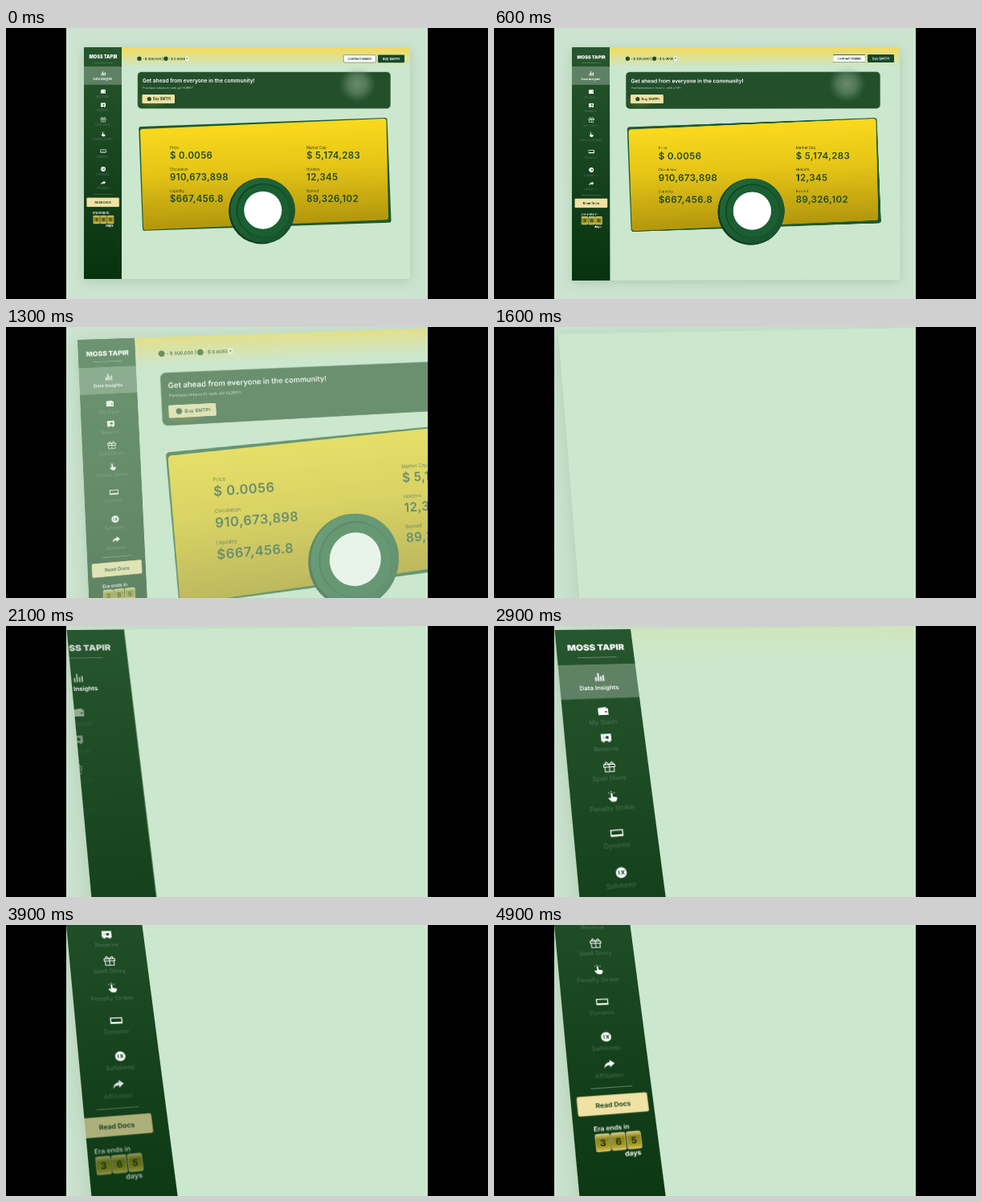
Recreate the animation shown at these times as an HTML page. Size 600 px wide and 338 px high, loop 5000 ms.

```html
<!DOCTYPE html>
<html lang="en">
<head>
<meta charset="utf-8">
<title>Token dashboard</title>
<style>
  html, body { margin: 0; width: 100%; height: 100%; overflow: hidden; background: #000; }
  #stage { position: absolute; left: 0; top: 0; width: 600px; height: 338px; overflow: hidden;
    background: #cce4cf; clip-path: inset(0 75px); }
  #panel { position: absolute; left: 0; top: 0; width: 812px; height: 578px; transform-origin: 0 0;
    background: #cbe7cd; box-shadow: 0 6px 24px rgba(20, 80, 40, .16); }
  svg { display: block; width: 100%; height: 100%; overflow: hidden; }
  text { font-family: Inter, Roboto, sans-serif; }
</style>
</head>
<body>
<div id="stage"><div id="panel">
<svg viewBox="97 24 406 289">
  <defs>
    <linearGradient id="sun" x2="0" y2="1">
      <stop stop-color="#f4da58"/><stop offset="1" stop-color="#f4da58" stop-opacity="0"/>
    </linearGradient>
    <linearGradient id="wood" x2="0" y2="1">
      <stop stop-color="#27572e"/><stop offset="1" stop-color="#07320f"/>
    </linearGradient>
    <linearGradient id="gold" gradientUnits="userSpaceOnUse" x1="318" y1="112" x2="324" y2="252">
      <stop stop-color="#fddc1e"/><stop offset=".45" stop-color="#e6c517"/><stop offset="1" stop-color="#ad920b"/>
    </linearGradient>
    <linearGradient id="tile" x2="0" y2="1">
      <stop stop-color="#d8cd82"/><stop offset=".3" stop-color="#8f8418"/>
      <stop offset=".7" stop-color="#a3931c"/><stop offset="1" stop-color="#d6c25a"/>
    </linearGradient>
    <linearGradient id="disc" x2="1" y2="1">
      <stop stop-color="#226b3a"/><stop offset="1" stop-color="#164f2a"/>
    </linearGradient>
    <radialGradient id="glow">
      <stop stop-color="#a0bca0" stop-opacity=".55"/><stop offset=".5" stop-color="#93b296" stop-opacity=".4"/>
      <stop offset="1" stop-color="#7fa083" stop-opacity="0"/>
    </radialGradient>
    <radialGradient id="olive">
      <stop stop-color="#7d7a22" stop-opacity=".7"/><stop offset="1" stop-color="#7d7a22" stop-opacity="0"/>
    </radialGradient>
  </defs>
  <rect id="head" x="144" y="24" width="359" height="25" fill="url(#sun)"/>
  <g id="main"></g>
  <g id="side"></g>
</svg>
</div></div>
<script>
const $ = id => document.getElementById(id);
const clamp = v => Math.max(0, Math.min(1, v));
const out = v => 1 - (1 - clamp(v)) ** 2;
const smooth = v => v * v * (3 - 2 * v);

const text = (x, y, size, str, weight = 400, fill = '#163d22', more = '') =>
  `<text x="${x}" y="${y}" font-size="${size}" font-weight="${weight}" fill="${fill}" ${more}>${str}</text>`;
const box = (x, y, w, h, r, fill, more = '') =>
  `<rect x="${x}" y="${y}" width="${w}" height="${h}" rx="${r}" fill="${fill}" ${more}/>`;
const dot = (x, y, r, fill) => `<circle cx="${x}" cy="${y}" r="${r}" fill="${fill}"/>`;
const slab = (d, paint) =>
  `<path d="${d}" fill="${paint}" stroke="${paint}" stroke-width="6" stroke-linejoin="round"/>`;
const mid = 'text-anchor="middle"';

// Main area
const stats = [
  [204, 'Price', '$ 0.0056', 'Circulation', '910,673,898', 'Liquidity', '$667,456.8'],
  [374, 'Market Cap', '$ 5,174,283', 'Holders', '12,345', 'Burned', '89,326,102']
].map(([x, ...s]) => s.map((v, i) => {
  const y = 150.5 + 27 * (i >> 1);
  return i % 2 ? text(x, y + 12.5, 11.4, v, 600, '#1d4a26', 'letter-spacing=".4"')
               : text(x, y, 4.5, v, 400, '#2f4a1c');
}).join('')).join('');

$('main').innerHTML =
  dot(166, 38.3, 2.7, '#1d4f2b') + text(170, 39.8, 4, '- $ 300,000 |', 600) +
  dot(199, 38.3, 2.7, '#1d4f2b') + text(202.5, 39.8, 4, '- $ 0.0056', 600) +
  box(223, 35.5, 4.4, 5.6, 1.5, '#eef4e6') + '<path d="M224.2 37.5h2l-1 1.4z" fill="#163d22"/>' +
  box(420.3, 33.7, 40, 9.3, 1, '#fff', 'stroke="#2a5636" stroke-width=".5"') +
  text(440.3, 39.8, 4, 'Connect Wallet', 600, '#163d22', mid) +
  box(463, 33.5, 33, 9.8, 1, '#15472a') + text(479.5, 39.8, 4, 'Buy $MTPI', 600, '#fff', mid) +
  box(164, 55, 314.5, 45.3, 4.5, '#234f2b', 'stroke="#4a7a52" stroke-width=".5"') +
  '<ellipse cx="182" cy="91" rx="20" ry="9" fill="url(#olive)"/>' + dot(437.5, 70, 23, 'url(#glow)') +
  text(170, 68.3, 6.6, 'Get ahead from everyone in the community!', 600, '#fff') +
  text(170.3, 76, 3.65, 'Purchase tokens to rank up! HURRY!', 400, '#bcd2bd') +
  box(169.5, 83, 40.5, 11, 1, '#f0e1a2') + dot(178.3, 88.5, 2.6, '#1d4f2b') +
  text(183, 90, 4.2, 'Buy $MTPI', 600) +
  slab('M168.3 126 471.5 115 476.5 239.8 173 249.8Z', '#1c5a2d') +
  slab('M170 129 470.4 116 473 236.2 174 248.8Z', 'url(#gold)') +
  stats +
  '<g id="coin">' + dot(318.3, 228.3, 41.2, '#0d3f1e') + dot(319.7, 227.4, 40.3, 'url(#disc)') +
  dot(320, 227.3, 33.5, '#0f4422') + dot(320.6, 227.8, 32.6, '#1a5e32') +
  dot(319.8, 227.2, 23.5, '#fff') + '</g>';

// Sidebar: label baseline, label, icon, reveal start
const items = [
  [65, 'Data Insights', 'M-2.6 2.6v-2.8h.9v2.8zM-1.1 2.6v-5.4h.9v5.4zM.4 2.6v-3.2h.9v3.2zM1.9 2.6v-4h.9v4z', 1850],
  [87.4, 'My Stash', 'M-3-2.1 1.8-2.7V-1.8H3V2.4H-3zM1.2-.1v1h1v-1z', 1890],
  [104.4, 'Reserve', 'M-3-2.5H3V2H-3zM-.4-.2a1 1 0 1 0 2 0a1 1 0 1 0-2 0zM-2-.4h1v.4h-1zM-2.2 2h1v.8h-1zM1.2 2h1v.8h-1z', 1940],
  [122.4, 'Spell Divvy', 'M-3.2-1.3H3.2V.2H-3.2zM-2.6.2V3H2.6V.2M0-1.3V3M0-1.3-1.6-3-2.4-2-1.2-1.3M0-1.3 1.6-3 2.4-2 1.2-1.3', 1990],
  [140.4, 'Penalty Striker', 'M-1-1.6a.5.5 0 0 1 1 0V.2L2.4.7V1.8L1.6 3.2H-.8L-2.6 1-1.9.5-1 1.2zM-.8-3.2h.5v.7h-.5zM-2.3-2.5h.5v.6h-.5zM.8-2.5h.5v.6h-.5z', 2040],
  [161.9, 'Dynamo', 'M-3.6-2H3.6V2H-3.6zM-3-1.4V.9H3v-2.3z', 2090],
  [184.4, 'Safekeep', 'M-3 0a3 3 0 1 0 6 0a3 3 0 1 0-6 0zM-1.5-1.2v2.4h.5v-2.4zM-.3-1.2.5 0-.3 1.2H.4L.9.4 1.4 1.2H2L1.2 0 2-1.2H1.4L.9-.4.4-1.2z', 2140],
  [201.4, 'Affiliation', 'M.4-2.6 3.2-.3.4 2V.6C-1.2.6-2.2 1.2-3 2.6-2.9.2-1.6-1.1.4-1.2z', 3470]
];
const reveal = (start, body, solid = '') => `<g data-start="${start}" data-solid="${solid}">${body}</g>`;
const rule = y => box(109, y, 24, .35, 0, '#fff', 'opacity=".45"');

$('side').innerHTML = box(97, 24, 47, 289, 0, 'url(#wood)') +
  '<g id="active">' + box(97, 48, 47, 22.8, 0, '#fff', 'opacity=".27"') + '</g>' +
  reveal(1720, text(121, 38.4, 5.6, 'MOSS TAPIR', 900, '#fff', mid) + rule(43)) +
  items.map(([y, label, d, start], i) => {
    const paint = i == 3 ? 'fill="none" stroke="#fff" stroke-width=".5"' : 'fill="#fff" fill-rule="evenodd"';
    const icon = `<path transform="translate(121 ${y - 8.3})" d="${d}" ${paint}/>`;
    const name = text(120.3, y, 3.75, label, i ? 400 : 600, '#fff', mid + (i ? ' opacity=".22"' : ''));
    return reveal(start, icon) + reveal(start, name, i ? '' : 1);
  }).join('') +
  reveal(3540, rule(207)) +
  reveal(3585, box(100.5, 211.8, 40.3, 11.2, 1, '#f0e1a4', 'stroke="#d9c67c" stroke-width=".3"') +
    text(120.7, 218.9, 3.9, 'Read Docs', 700, '#1d4a26', mid)) +
  reveal(3630, text(118.3, 232.3, 3.8, 'Era ends in', 600, '#fff', mid) +
    [3, 6, 5].map((n, i) => box(108.6 + 8.8 * i, 234, 8, 10, 1, 'url(#tile)', 'stroke="#dcd49a" stroke-width=".3"') +
      text(112.6 + 8.8 * i, 241, 5.2, n, 700, '#12331a', mid)).join('') +
    text(128.8, 247.8, 3.9, 'days', 700, '#fff', mid));

// Projections as a, d, g, b, e, h, c, f of x' = (ax + by + c) / (gx + hy + 1)
const flat = [1, 0, 0, 0, 1, 0, 97, 24];
const tilt = [1.56, -.045, .000304, .0578, 1.468, -.00008, 89, 16];
const close = [2.112, -.0189, .000597, .1123, 1.798, -.000725, 75.5, 5];
const mix = (p, q, k) => p.map((v, i) => v + (q[i] - v) * k);
const revealed = [...document.querySelectorAll('[data-start]')];

function draw(t) {
  const second = t >= 1600;
  const zoom = Math.min(1, t / 1300) ** 5.6;
  const m = t < 1300 ? mix(flat, tilt, zoom)
                     : mix(tilt, close, 1 - (1 - clamp((t - 1300) / 1000)) ** 3);
  const [a, d, g, b, e, h, c, f] = m;
  const scroll = 80 * smooth(1 - (1 - clamp((t - 2920) / 2080)) ** 2.2);
  $('panel').style.transform =
    `matrix3d(${[a, d, 0, g, b, e, 0, h, 0, 0, 1, 0, c, f, 0, 1].map(v => v.toFixed(7))}) translateY(${-scroll}px) scale(.5)`;

  const fade = 1 - clamp((t - 1150) / 350);
  $('main').setAttribute('opacity', fade);
  $('head').setAttribute('opacity', second ? .14 * clamp((t - 2500) / 400) : fade);
  $('coin').setAttribute('transform', `translate(${6 * zoom} ${zoom / 2})`);

  $('side').setAttribute('opacity', second ? 1 : fade);
  $('side').setAttribute('transform', `translate(${second ? -47 * (1 - out((t - 1700) / 800)) : 0} 0)`);
  $('active').setAttribute('opacity', second ? clamp((t - 2120) / 400) : 1);
  for (const el of revealed) {
    const k = second ? out((t - el.dataset.start) / 700) : 1;
    el.setAttribute('transform', `translate(${-20 * (1 - k)} 0)`);
    el.setAttribute('opacity', el.dataset.solid ? 1 : k);
  }
}

const begin = performance.now();
(function tick() {
  draw((performance.now() - begin) % 5000);
  requestAnimationFrame(tick);
})();
</script>
</body>
</html>
```
